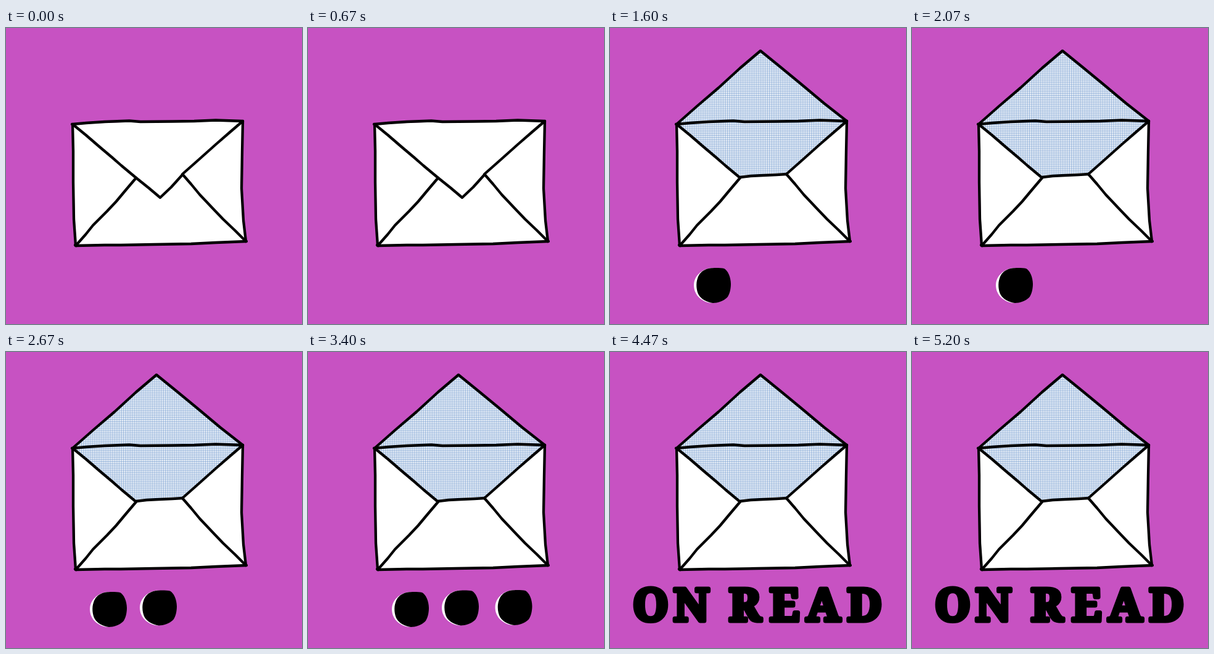
These frames come from a looping animation (480x480 px, 5.47 s). An HTML page:

```html
<!DOCTYPE html>
<html lang="en">
<head>
<meta charset="utf-8">
<title>On read</title>
<style>
  html, body { margin: 0; width: 100%; height: 100%; overflow: hidden; background: #c752c2; }
  svg { display: block; width: 100vw; height: 100vh; }
  .ink { fill: none; stroke: #000; stroke-width: 4.3; stroke-linecap: round; stroke-linejoin: round; }
  .paper { fill: #fff; }
  .grid { fill: none; stroke: #5283c4; stroke-opacity: .55; stroke-width: 1; }
  text {
    font: 800 73.5px "Noto Serif", serif;
    text-anchor: middle;
    stroke: #000; stroke-width: 7; stroke-linejoin: round;
  }
  [hidden] { display: none; }
</style>
</head>
<body>
<svg viewBox="0 0 480 480">
  <defs>
    <clipPath id="lining">
      <path d="M108 156L244 37L384 151L286 237L211 242Z"/>
    </clipPath>
    <g id="dot">
      <path class="paper" d="M164 389C149 391 136 402 136 417C136 434 150 445 165 446L176 440V392Z"/>
      <path d="M154 392C162 388 178 389 185 390C191 393 196 404 196 415C196 423 194 432 190 437C184 443 174 446 167 446C158 445 148 440 144 433C140 426 139 414 142 406C144 399 149 394 154 392Z"/>
    </g>
  </defs>

  <path class="paper" d="M108 156L215 152L384 151L382 260L389 346L240 351L113 353Z"/>
  <g id="open">
    <g clip-path="url(#lining)">
      <path class="paper" d="M100 30H390V250H100Z"/>
      <path class="grid" id="mesh"/>
    </g>
    <path class="ink" d="M108 156L142 126L176 97L211 65L244 37L276 63L310 91L347 122L384 151M211 242L228 240L248 239L270 238L286 237"/>
  </g>
  <path class="ink" id="tip" d="M211 243L231 259L250 275L268 258L286 238"/>
  <path class="ink" d="M108 156L130 154L160 152L200 150.5L218 152L270 151.5L305 151L340 149.5L384 151L383 200L382 260L385 312L389 346L340 348L300 350L240 351L186 352L160 352L113 353L110 310L109 250L109 200Z"/>
  <path class="ink" d="M108 156L130 174L152 193L171 209L187 223L211 243L194 263L179 281L164 297L141 320L129 335L113 353"/>
  <path class="ink" d="M384 151L363 169L340 189L312 214L286 237L300 253L314 270L331 288L352 310L371 328L389 346"/>
  <path class="ink" d="M107 156L109 157M112 352L114 353M388 346L390 346"/>

  <use id="dot1" href="#dot"/>
  <use id="dot2" href="#dot" x="81" y="-2.5"/>
  <use id="dot3" href="#dot" x="167.5" y="-3"/>
  <text id="words" y="436.3" x="66 132 177 219 283 346 413">ON READ</text>
</svg>
<script>
  const LOOP = 5470, BEAT = 700;

  // id: [appears, disappears]
  const spans = {
    tip: [0, BEAT],
    open: [BEAT, LOOP],
    dot1: [2 * BEAT, 5 * BEAT],
    dot2: [3 * BEAT, 5 * BEAT],
    dot3: [4 * BEAT, 5 * BEAT],
    words: [5 * BEAT, LOOP],
  };
  const parts = Object.entries(spans).map(([id, span]) => [document.getElementById(id), ...span]);

  const STEP = 2.957;
  let mesh = "";
  for (let x = 101.8; x < 390; x += STEP) mesh += `M${x.toFixed(2)} 30V250`;
  for (let y = 32.6; y < 250; y += STEP) mesh += `M100 ${y.toFixed(2)}H390`;
  document.getElementById("mesh").setAttribute("d", mesh);

  const start = performance.now();
  function draw() {
    const t = (performance.now() - start) % LOOP;
    for (const [el, from, to] of parts) el.toggleAttribute("hidden", t < from || t >= to);
    requestAnimationFrame(draw);
  }
  draw();
</script>
</body>
</html>
```
